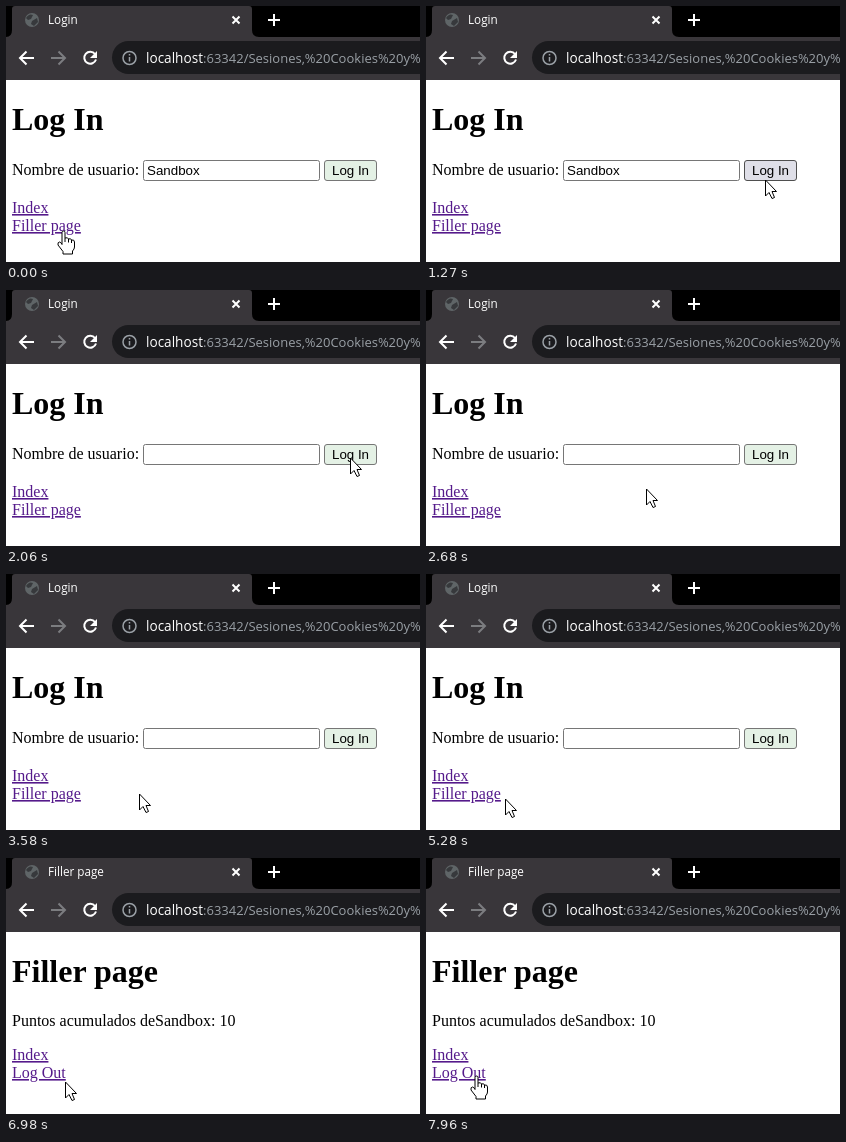
An HTML page that plays this animation: 414x256 px, repeating every 8000 ms.

```html
<!DOCTYPE html>
<html lang="es">
<head>
<meta charset="utf-8">
<title>Login</title>
<style>
  html, body { margin: 0; width: 100%; height: 100%; overflow: hidden; background: #fff; }
  svg { display: block; width: 414px; height: 256px; }
  .ui { font-family: "Open Sans", "Noto Sans", sans-serif; }
  .page { font: 16px "Liberation Serif", serif; }
  .heading { font-size: 32px; font-weight: bold; }
  .control { font: 13.333px "Liberation Sans", sans-serif; }
  .link { fill: #551a8b; text-decoration: underline; }
  .icon { fill: none; stroke: #fff; stroke-width: 2; }
  .cursor { fill: #fff; stroke: #000; stroke-linejoin: round; }
</style>
</head>
<body>
<svg viewBox="0 0 414 256">
  <g class="ui">
    <rect width="414" height="32"/>
    <path fill="#39363a" d="M0 74V31Q6 31 6 24V3Q6 0 9 0H243Q246 0 246 3V24Q246 31 253 31H414V74Z"/>
    <rect x="106" y="35" width="340" height="33" rx="16.5" fill="#1b1b1e"/>
    <circle cx="26" cy="14" r="7" fill="#5f6567"/>
    <path fill="#37393c" d="M20 12Q23 7 27 9L25 13 22 14ZM26 15L31 12 32 16 28 20 25 18Z"/>
    <text id="tabTitle" x="42" y="18" font-size="11.7" font-weight="500" fill="#fff"></text>
    <path class="icon" d="M226.5 10.5l7 7m0-7l-7 7"/>
    <path class="icon" d="M262 14h12M268 8v12"/>
    <path class="icon" d="M28 52H14M20.5 45.5L14 52l6.5 6.5"/>
    <path class="icon" style="stroke:#7c7d80" d="M45 52h14M52.5 45.5L59 52l-6.5 6.5"/>
    <path class="icon" d="M89 48A6 6 0 1 0 90 53.5"/>
    <path fill="#fff" d="M91 45v7h-7Z"/>
    <g class="icon" style="stroke:#9aa0a6;stroke-width:1.5">
      <circle cx="123.5" cy="52" r="6.5"/>
      <path d="M123.5 51v4.500M123.5 48v1.500"/>
    </g>
    <text x="140" y="57" font-size="13.6" fill="#fff">localhost</text>
    <text x="197" y="57" font-size="13" fill="#9aa0a6">:63342/Sesiones,%20Cookies%20y%</text>
  </g>

  <g class="page" id="loginPage">
    <text class="heading" x="6" y="124">Log In</text>
    <text x="6" y="169">Nombre de usuario:</text>
    <rect x="137.5" y="154.5" width="176" height="20" rx="2" fill="#fff" stroke="#767676"/>
    <text class="control" id="userName" x="141" y="169">Sandbox</text>
    <rect id="button" x="318.5" y="154.5" width="52" height="20" rx="2.5"/>
    <text class="control" x="344.5" y="169" text-anchor="middle">Log In</text>
    <text class="link" x="6" y="207">Index</text>
    <text class="link" x="6" y="225">Filler page</text>
  </g>

  <g class="page" id="fillerPage">
    <text class="heading" x="6" y="124">Filler page</text>
    <text x="6" y="168">Puntos acumulados deSandbox: 10</text>
    <text class="link" x="6" y="202">Index</text>
    <text class="link" x="6" y="220">Log Out</text>
  </g>

  <path class="cursor" id="arrow" d="M.5 0V16L4 12.5 7 18.5 9.5 17.5 7 11.5H11.5Z"/>
  <g class="cursor" id="hand">
    <path d="M-2 13V1.500Q-2 0-.5 0T1 1.500V7Q4 6 4.500 8 7 7 7.500 9 10.500 8.500 10.500 11V16Q10.500 18 8.500 20V23H-1V20.500L-6 14Q-6.500 11-4.500 11-3 11-2 13.500Z"/>
    <path d="M1 7v4M4.500 8v3.500M7.500 9v3"/>
  </g>
</svg>
<script>
const LOOP = 8000, SUBMITTED = 1900, FILLER_OPEN = 6380;

const start = { x: 58, y: 225 };
// Each move slows down towards its end; the higher the power, the more
const moves = [
  { from: 270, to: 1270, x: 339, y: 174, power: 2 },
  { from: 1270, to: 1570, x: 344, y: 168, power: 2 },
  { from: 2080, to: 3780, x: 130, y: 221, power: 2 },
  { from: 3780, to: 5880, x: 62, y: 227, power: 1.1 },
  { from: 6880, to: 7280, x: 55, y: 220, power: 2 },
  { from: 7380, to: 7880, x: 51, y: 218, power: 2 }
];

const el = id => document.getElementById(id);
const show = (id, visible) => el(id).setAttribute("display", visible ? "inline" : "none");

function pointerAt(t) {
  let { x, y } = start;
  for (const move of moves) {
    const k = Math.min(1, Math.max(0, (t - move.from) / (move.to - move.from)));
    const eased = 1 - (1 - k) ** move.power;
    x += (move.x - x) * eased;
    y += (move.y - y) * eased;
  }
  return [Math.round(x), Math.round(y)];
}

function captureTime(t) {
  const phase = t < 2080 ? 70 : 80;
  return Math.floor((t - phase) / 100) * 100 + phase;
}

function draw() {
  const t = performance.now() % LOOP;
  const [x, y] = pointerAt(captureTime(t));
  const filler = t >= FILLER_OPEN;
  const overLink = x < (filler ? 59 : 76);
  const overButton = t < SUBMITTED && x >= 318 && y <= 175;

  el("tabTitle").textContent = filler ? "Filler page" : "Login";
  show("loginPage", !filler);
  show("fillerPage", filler);
  show("userName", t < SUBMITTED);
  el("button").setAttribute("fill", overButton ? "#dfdfe8" : "#e4f1e5");
  el("button").setAttribute("stroke", overButton ? "#4f4f4f" : "#767676");

  show("hand", overLink);
  show("arrow", !overLink);
  el(overLink ? "hand" : "arrow").setAttribute("transform", `translate(${x} ${y})`);
  requestAnimationFrame(draw);
}
draw();
</script>
</body>
</html>
```
